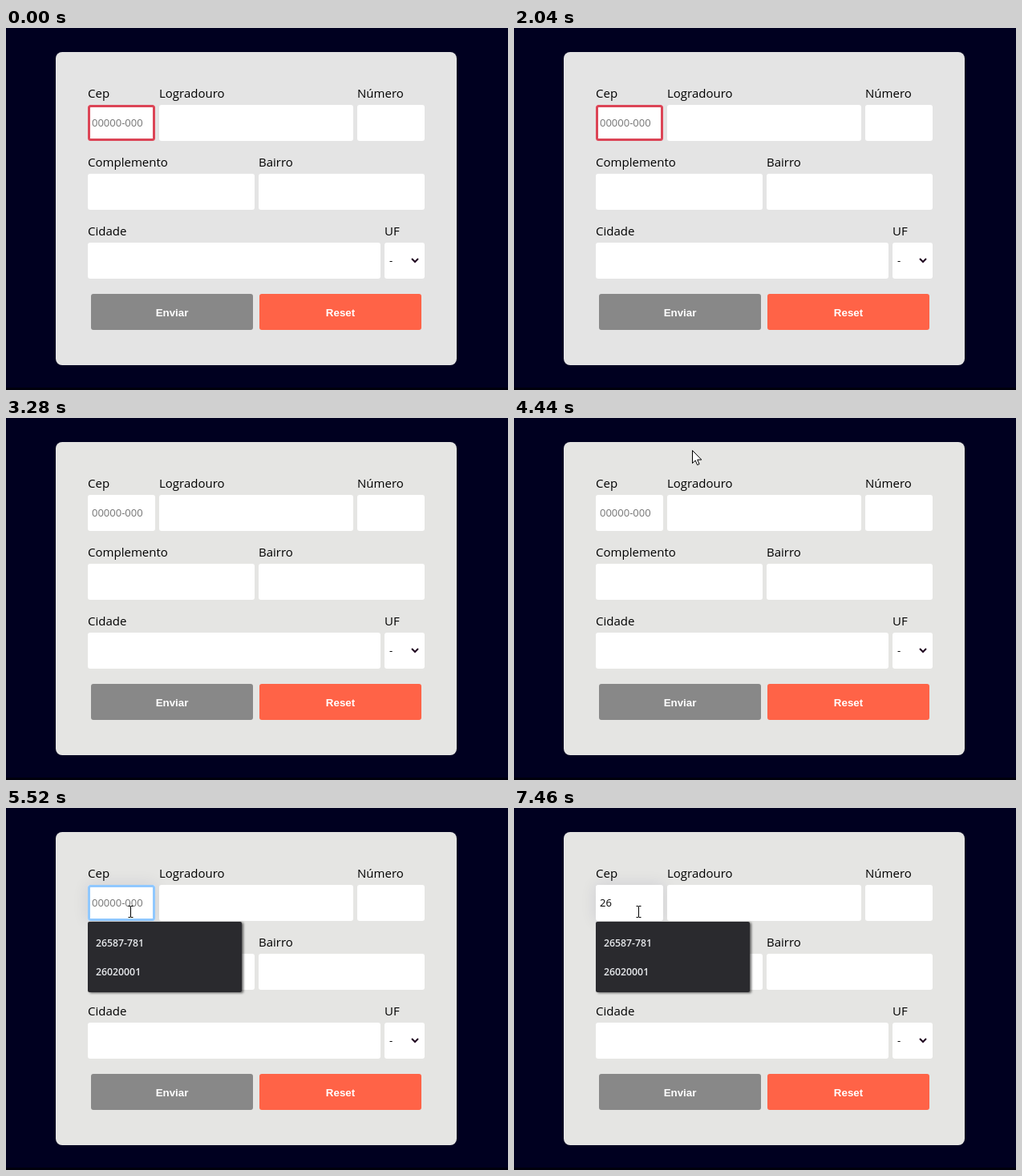
Recreate the animation shown at these times as an HTML page. Size 626 px wide and 452 px high, loop 8 s.

```html
<!DOCTYPE html>
<html lang="pt">
<head>
<meta charset="utf-8">
<style>
  html, body { margin: 0; height: 100%; overflow: hidden; background: #000020; }
  svg { display: block; width: 626px; height: 452px; }
  .label { font: 15px "Open Sans", sans-serif; }
  .value { font: 13px "Open Sans", sans-serif; }
  .button { font: bold 13.33px "Liberation Sans", Arial, sans-serif; fill: #fff; text-anchor: middle; }
  .option { font: 600 12.3px "Open Sans", sans-serif; fill: #e8eaed; }
</style>
</head>
<body>
<svg viewBox="0 0 626 452">
  <defs>
    <filter id="soft" x="-1" y="-1" width="3" height="3"><feGaussianBlur stdDeviation="10"/></filter>
    <filter id="drop" x="-.1" y="-.1" width="1.2" height="1.3"><feDropShadow dy="1" stdDeviation="1.5" flood-opacity=".6"/></filter>
  </defs>
  <rect width="626" height="452" fill="#000020"/>
  <rect y="449" width="626" height="3" fill="#00000c"/>
  <g id="page">
    <rect id="card" x="62" y="30" width="500" height="391" rx="8"/>
    <rect id="glow" x="102" y="96" width="84" height="45" fill="#00003c" filter="url(#soft)"/>
    <g id="form"></g>
    <rect id="border" x="103.5" y="97.5" width="81" height="42" rx="2" fill="none" stroke-width="3"/>
    <text id="cep" class="value" x="107" y="123"></text>
    <rect id="caret" y="111" width="1" height="15"/>
    <text class="value" x="478" y="295">-</text>
    <path d="M506 288l4 4 4-4" fill="none" stroke="#200020" stroke-width="2"/>
    <g id="menu">
      <rect x="102" y="142" width="192" height="88" rx="2" fill="#292a2d" filter="url(#drop)"/>
      <text class="option" x="112" y="173">26587-781</text>
      <text class="option" x="112" y="209">26020001</text>
    </g>
  </g>
  <circle id="halo" cx="153" cy="128.5" r="12" fill="#ff0" opacity=".5"/>
  <g id="cursor">
    <path id="arrow" d="M.5.5v16l3.7-3.5 2.4 5.6 2.5-1.1-2.4-5.4h5.1z" fill="#fff" stroke="#000"/>
    <path id="beam" d="M-2.5-6.5h2.5l.5.5.5-.5h2.5M.5-6v13M-2.5 7.5h2.5l.5-.5.5.5h2.5" fill="none" stroke="#000"/>
  </g>
</svg>
<script>
const LOOP = 8000, RELOAD = 3200, READY = 3280, FOCUS = 4900, TYPE_1 = 6380, TYPE_2 = 6910;
const el = Object.fromEntries([...document.querySelectorAll('[id]')].map(e => [e.id, e]));

// label, x, top, width
const fields = [
  ['Cep', 102, 96, 84], ['Logradouro', 191, 96, 242], ['Número', 438, 96, 84],
  ['Complemento', 102, 182, 208], ['Bairro', 315, 182, 207],
  ['Cidade', 102, 268, 365], ['UF', 472, 268, 50],
];
const buttons = [['Enviar', 106, '#888'], ['Reset', 316, '#ff6347']];
el.form.innerHTML = fields.map(([name, x, y, w]) =>
  `<rect x="${x}" y="${y}" width="${w}" height="45" rx="3" fill="#fff"/>
   <text class="label" x="${x}" y="${y - 9}">${name}</text>`).join('') +
  buttons.map(([name, x, color]) =>
  `<rect x="${x}" y="332" width="202" height="45" rx="3" fill="${color}"/>
   <text class="button" x="${x + 101}" y="360">${name}</text>`).join('');

const between = (t, a, b) => t >= a && t < b;
const ramp = (t, a, b) => Math.min(1, Math.max(0, (t - a) / (b - a)));
const show = (e, on) => e.style.display = on ? '' : 'none';
const easeOut = p => 1 - (1 - p) ** 2;
const linear = p => p;

const moves = [
  { start: 710, end: 1180, steps: 7, from: [615, 514], to: [234, 200], ease: easeOut },
  { start: 1330, end: 2040, steps: 10, from: [234, 200], to: [2, 77], ease: linear, leaves: true },
  { start: 4290, end: 4750, steps: 7, from: [287, -45], to: [155, 129], ease: easeOut },
];

function cursorAt(t) {
  const move = moves.findLast(m => t >= m.start);
  if (!move || (move.leaves && t >= move.end)) return null;
  const step = Math.floor(ramp(t, move.start, move.end) * (move.steps - 1) + 1e-6) + 1;
  const p = move.ease(step / move.steps);
  return move.from.map((v, i) => Math.round(v + (move.to[i] - v) * p));
}

function drawCursor(t) {
  const pos = cursorAt(t);
  show(el.cursor, pos);
  if (!pos) return;
  const [x, y] = pos;
  const overText = fields.some(([name, fx, fy, w]) =>
    name !== 'UF' && between(x, fx, fx + w) && between(y, fy, fy + 45));
  el.cursor.setAttribute('transform', `translate(${x} ${y})`);
  show(el.arrow, !overText);
  show(el.beam, overText);
}

function draw(now) {
  const t = now % LOOP;
  show(el.page, !between(t, RELOAD, READY));
  el.card.setAttribute('fill', t < RELOAD ? '#e4e4e4' : '#e5e5e3');

  const focus = ramp(t, FOCUS, 5290);
  el.glow.setAttribute('opacity', focus * .1);
  el.border.setAttribute('stroke', t < RELOAD ? '#dc4556' : '#90c8ff');
  el.border.setAttribute('opacity', t < RELOAD ? 1 : easeOut(focus) * (1 - ramp(t, TYPE_1, 6600)));

  const typed = t < TYPE_1 ? '' : t < TYPE_2 ? '2' : '26';
  el.cep.textContent = typed || '00000-000';
  el.cep.setAttribute('fill', typed ? '#000' : '#757575');
  el.caret.setAttribute('x', [107, 114, 122][typed.length]);
  show(el.caret, between(t, FOCUS, 5520) || between(t, 5980, 7460));

  show(el.menu, t >= FOCUS);
  show(el.halo, between(t, FOCUS, 5130));
  drawCursor(t);
  requestAnimationFrame(draw);
}
requestAnimationFrame(draw);
</script>
</body>
</html>
```
